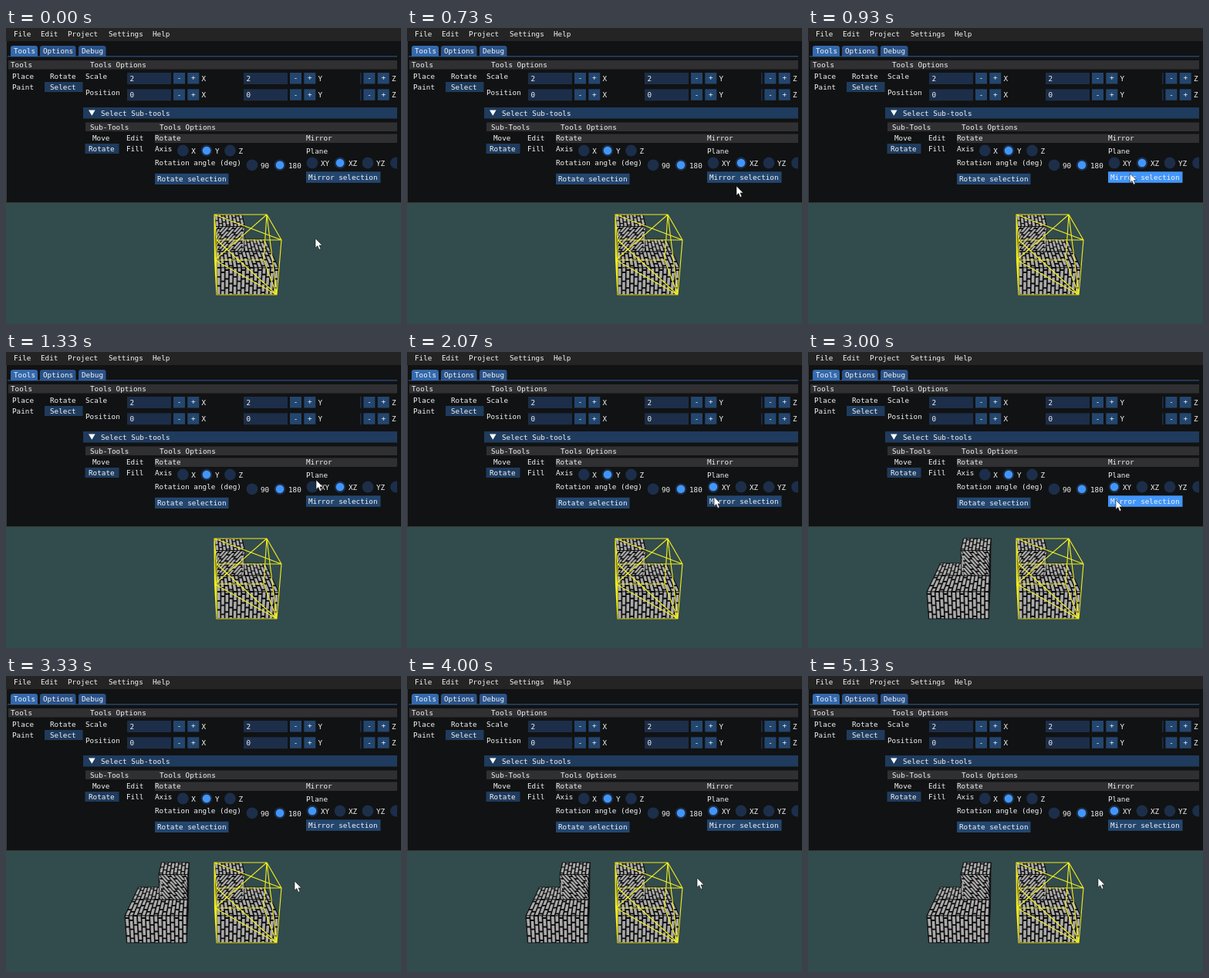
Recreate the animation shown at these times as an HTML page. Size 512 by 384 pixels, loop 5190 ms.

```html
<!DOCTYPE html>
<html lang="en">
<head>
<meta charset="utf-8">
<title>Mirror tool</title>
<style>
html, body { margin: 0; width: 100%; height: 100%; overflow: hidden; background: #324b4d; }
svg { display: block; width: 512px; height: 384px; }
text { font: 9.3px "DejaVu Sans Mono", monospace; fill: #f4f4f4; }
</style>
</head>
<body>
<svg id="stage" viewBox="0 0 512 384">
  <defs><clipPath id="panel"><rect width="507" height="227"/></clipPath></defs>
  <g id="scene"></g>
  <g id="ui"></g>
  <path id="cursor" d="M0 0V12.2L2.8 9.6L4.9 14.4L7 13.5L5 8.9H8.9Z" fill="#fff" stroke="#111" stroke-width=".6"/>
</svg>
<script>
const NS = "http://www.w3.org/2000/svg";
const $ = id => document.getElementById(id);
const ui = $("ui"), scene = $("scene"), cursor = $("cursor");
const BUTTON = "#23466f", FRAME = "#1c2e49", HEADER = "#1f3b5d", ROW = "#303033",
      HOVER = "#4296fa", PRESS = "#0f87fa", RADIO_HOVER = "#264a75", YELLOW = "#efec1f";

function add(parent, tag, attrs) {
  const el = document.createElementNS(NS, tag);
  for (const k in attrs) el.setAttribute(k, attrs[k]);
  parent.appendChild(el);
  return el;
}
const box = (x, y, x2, y2, fill) =>
  add(ui, "rect", { x, y, width: x2 - x, height: y2 - y, fill });
function label(x, mid, str) {
  add(ui, "text", { x, y: mid + 3.2 }).textContent = str;
}
function button(x, y, x2, y2, str, pad) {
  const el = box(x, y, x2, y2, BUTTON);
  label(x + pad, (y + y2) / 2, str);
  return el;
}
function radio(x, y, str, on) {
  const ring = add(ui, "circle", { cx: x, cy: y, r: 7.4, fill: FRAME });
  const dot = add(ui, "circle", { cx: x, cy: y, r: 5.3, fill: HOVER });
  dot.style.display = on ? "" : "none";
  label(x + 11, y + .5, str);
  return { ring, dot };
}
function tab(x, x2, str, fill) {
  add(ui, "path", { d: `M${x} 37V26.2Q${x} 23 ${x + 3.2} 23H${x2 - 3.2}Q${x2} 23 ${x2} 26.2V37Z`, fill });
  label(x + 4, 30, str);
}
function numberField(x, y, value, axis) {
  box(x, y, x + 57, y + 15, FRAME);
  label(x + 3.5, y + 7.3, value);
  steppers(x + 60, y, axis);
}
function steppers(x, y, axis) {
  button(x, y, x + 15, y + 14.5, "-", 4.8);
  button(x + 18.3, y, x + 33.3, y + 14.5, "+", 4.8);
  label(x + 36.5, y + 7.3, axis);
}

// Panel
ui.setAttribute("clip-path", "url(#panel)");
box(0, 0, 512, 227, "#111213");
const edge = add($("stage"), "path", { d: "M.5 17V226.6H512", fill: "none", stroke: "#3f4245", "stroke-width": .9 });
$("stage").insertBefore(edge, cursor);
const bar = add(scene, "g", {});
add(bar, "rect", { x: 507, width: 5, height: 227, fill: "#111213" });
add(bar, "rect", { x: 507, width: 5, height: 17, fill: "#242424" });
box(0, 0, 512, 17, "#242424");
[[10, "File"], [45, "Edit"], [80, "Project"], [133, "Settings"], [190, "Help"]]
  .forEach(([x, s]) => label(x, 8, s));

tab(6, 41, "Tools", "#3369ad");
tab(44, 90.5, "Options", "#2a5288");
tab(94, 129.5, "Debug", "#2a5288");
box(2, 36.4, 507, 37.3, "#3369ad");

box(3, 42, 507, 53.5, ROW);
label(6, 48, "Tools");
label(109, 48, "Tools Options");
label(8, 62.5, "Place");
label(57, 62.5, "Rotate");
label(8, 76.5, "Paint");
box(50, 70, 99.5, 83, HEADER);
label(57, 76.5, "Select");

label(103, 62.5, "Scale");
label(103, 84, "Position");
for (const [y, v] of [[58, "2"], [79.3, "0"]]) {
  numberField(157, y, v, "X");
  numberField(308, y, v, "Y");
  box(459, y, 460.6, y + 15, FRAME);
  steppers(463.4, y, "Z");
}

box(100, 103, 507, 117.5, HEADER);
add(ui, "path", { d: "M107 106.5H115.6L111.3 113.8Z", fill: "#fff" });
label(123, 110.3, "Select Sub-tools");
box(103, 122.5, 507, 134, ROW);
label(109, 128.3, "Sub-Tools");
label(199, 128.3, "Tools Options");
label(112, 143, "Move");
label(156, 143, "Edit");
box(102.5, 150, 146.5, 163, HEADER);
label(107, 156.7, "Rotate");
label(156, 156.7, "Fill");

box(193, 137.5, 507, 149, ROW);
label(193, 143.2, "Rotate");
label(389, 143.2, "Mirror");
label(193, 156.7, "Axis");
radio(229.3, 159, "X");
radio(260, 159, "Y", true);
radio(290.5, 159, "Z");
label(193, 175.2, "Rotation angle (deg)");
radio(319, 177.8, "90");
radio(355, 177.8, "180", true);
button(193, 188.8, 288.5, 203, "Rotate selection", 3);

label(389, 159.3, "Plane");
const xy = radio(397, 175, "XY"), xz = radio(433, 175, "XZ", true);
radio(469, 175, "YZ");
radio(505.5, 175, "");
const mirror = button(389, 186.3, 485.5, 200.8, "Mirror selection", 3);

// Blocks
const mix = (a, b, k) => a + (b - a) * k;
const at = (q, u, v) => [0, 1].map(i =>
  mix(mix(q[0][i], q[1][i], u), mix(q[3][i], q[2][i], u), v));
const poly = pts => "M" + pts.map(p => p.map(n => n.toFixed(1)).join(" ")).join("L") + "Z";

// Corners: top left, top right, bottom right, bottom left.
function face(parent, q, cols, rows, slant = 0) {
  add(parent, "path", { d: poly(q), fill: "#0b0b0b" });
  let d = "";
  const clamp = n => Math.min(1, Math.max(0, n));
  for (let c = -Math.ceil(slant * cols); c < cols + slant * cols; c++) {
    for (let r = -1; r < rows; r++) {
      const shift = (c & 1) * .5 + (c & 2) * .12;
      const v1 = clamp((r + shift + .09) / rows), v2 = clamp((r + shift + .93) / rows);
      if (v2 - v1 < .02) continue;
      const u = (n, v) => clamp((c + n) / cols + slant * (.5 - v));
      const pts = [[u(.17, v1), v1], [u(.86, v1), v1], [u(.86, v2), v2], [u(.17, v2), v2]];
      if (pts[1][0] - pts[0][0] + pts[2][0] - pts[3][0] > .01)
        d += poly(pts.map(p => at(q, ...p)));
    }
  }
  add(parent, "path", { d, fill: "#aaa9aa" });
  add(parent, "path", { d: poly(q), fill: "none", stroke: "#0b0b0b", "stroke-width": .8 });
}
function blocks(parent) {
  add(parent, "path", { d: "M270 242L272 257.5V290L273 311V346L270.5 301Z", fill: "#171717" });
  face(parent, [[307, 274], [336, 274], [343.5, 290], [309.5, 290]], 7, 2);
  face(parent, [[272, 290], [343.5, 290], [353.5, 311], [273, 311]], 15, 2);
  face(parent, [[273, 311], [353.5, 311], [351, 346], [273, 346]], 15, 3);
  face(parent, [[271.5, 257.5], [309.5, 257.5], [308.5, 290], [272, 290]], 8, 3, .75);
  face(parent, [[270, 242], [306, 242], [309.5, 257.5], [271.5, 257.5]], 8, 2);
}
blocks(add(scene, "g", {}));
const copy = add(scene, "g", { transform: "translate(507.5) scale(-1 1)" });
blocks(copy);

// Selection cage: outline of both caps, uprights, face diagonals
add(scene, "path", {
  d: "M270 242H338L357 275H273ZM270.5 301H334L351 346H273Z" +
     "M270 242L270.5 301M338 242L334 301M357 275L351 346M273 275V346" +
     "M270 242L357 275M338 242L351 346M270.5 301L338 242M270.5 301L351 346M273 275L351 346M270 242L273 346",
  fill: "none", stroke: YELLOW, "stroke-width": 1.15, "stroke-linejoin": "round"
});

// Pointer: time, x, y
const LOOP = 5190, STEP = 200 / 3, PICK = 1860, CLICK = 2930;
const path = [
  [0, 401, 273], [200, 401, 273], [733, 427, 205], [1190, 403, 165], [1333, 402, 166],
  [1600, 400, 170], [1930, 400, 173], [2000, 399, 184.5], [2067, 398, 188], [2200, 399, 192],
  [3000, 399, 192], [3333, 374, 266], [3667, 376, 262], [LOOP + STEP, 376, 262]
];
function pointer(t) {
  t = Math.max(0, t);
  const i = Math.max(1, path.findIndex(p => p[0] > t));
  const a = path[i - 1], b = path[i];
  const k = (t - a[0]) / (b[0] - a[0]), e = k * k * (3 - 2 * k);
  return [mix(a[1], b[1], e), mix(a[2], b[2], e)];
}
const inside = ([x, y], x1, y1, x2, y2) => x >= x1 && x <= x2 && y >= y1 && y <= y2;

function draw(time) {
  const t = Math.floor((time % LOOP + 4) / STEP) * STEP;
  const [x, y] = pointer(t), seen = pointer(t - STEP);
  cursor.setAttribute("transform", `translate(${x.toFixed(2)} ${y.toFixed(2)})`);
  const picked = t >= PICK;
  xy.dot.style.display = picked ? "" : "none";
  xz.dot.style.display = picked ? "none" : "";
  xy.ring.setAttribute("fill", inside(seen, 389, 167, 419, 182) ? RADIO_HOVER : FRAME);
  const over = inside(seen, 389, 186.3, 485.5, 200.8);
  const down = t > CLICK - 2 * STEP && t < CLICK;
  mirror.setAttribute("fill", over ? (down ? PRESS : HOVER) : BUTTON);
  copy.style.display = t >= CLICK ? "" : "none";
}

const start = performance.now();
function tick() {
  draw(performance.now() - start);
  requestAnimationFrame(tick);
}
tick();
</script>
</body>
</html>
```
